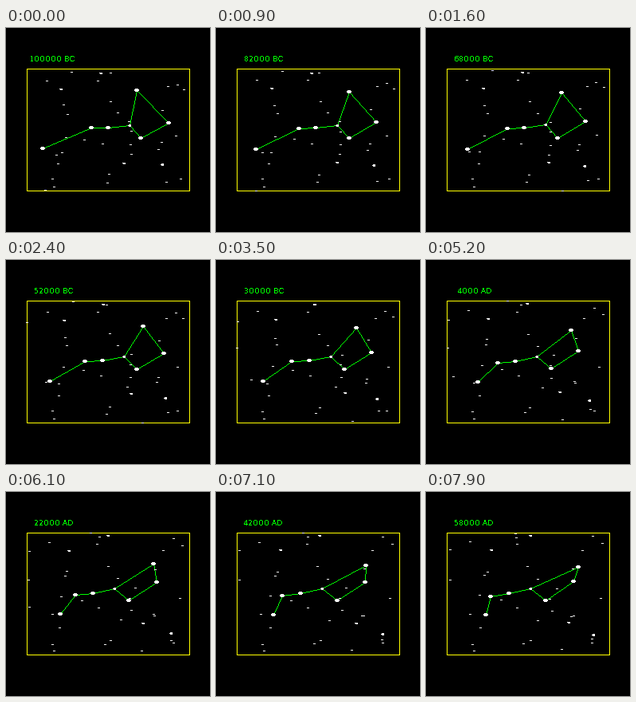
Write a matplotlib script that moves like this. It is 256x256 px and loops after 8 s.

```python
import numpy as np
import matplotlib as mpl
import matplotlib.pyplot as plt
from matplotlib.animation import FuncAnimation
from matplotlib.collections import PolyCollection
from matplotlib.patches import Rectangle

FRAMES, STEP = 80, 100
SIZE, DPI = 256, 64
PX = 72 / DPI  # points per pixel
LEFT, TOP, RIGHT, BOTTOM = 26, 51, 230, 204
GREEN, YELLOW = "#00ff00", "#ffff00"

mpl.rcParams["text.antialiased"] = False
mpl.rcParams["text.hinting"] = "force_autohint"
mpl.rcParams["text.hinting_factor"] = 1

# Widths of the pixel rows of a dot, by brightness.
DOTS = [[3], [4, 3], [3, 4, 3], [4, 6, 6, 4]]

# Brightness, then x, y at the start and at the end of the loop.
DIPPER = [
    (3, 46.3, 151.2, 75, 154), (3, 107, 125, 80.5, 130.5),
    (3, 128, 125, 103.5, 127.4), (2, 155, 121.6, 131, 121),
    (3, 164.4, 77.8, 190.7, 93.8), (3, 203.6, 118.8, 185, 111.8),
    (3, 169.4, 138, 150, 135.6),
]
LINK = [0, 1, 2, 3, 4, 5, 6, 3]
OTHERS = [
    (2, 196, 171, 210, 178.5), (1, 69, 77, 82, 72.5),
    (1, 148, 170, 179, 164), (1, 118.5, 57, 131, 54.5),
]


def field(n, seed=7, margin=12):
    """Faint stars: scattered evenly, most drift slowly and a few fast."""
    rng = np.random.default_rng(seed)
    x = rng.uniform(LEFT - margin, RIGHT + margin, n)
    y = rng.uniform(TOP - margin, BOTTOM + margin, n)
    dx, dy = rng.standard_t(2, (2, n)) * [[9], [4]]
    return np.column_stack([np.zeros(n), x, y, x + dx, y + dy])


STARS = np.vstack([DIPPER, OTHERS, field(42)])


def place(u):
    pos = STARS[:, 1:3] * (1 - u) + STARS[:, 3:] * u
    return np.floor(pos + 0.5)


def bar(x, y, w=1):
    return [(x, y), (x + w, y), (x + w, y + 1), (x, y + 1)]


def dot(x, y, level):
    rows = DOTS[int(level)]
    top = y - len(rows) // 2
    return [bar(x - w // 2, top + i, w) for i, w in enumerate(rows)]


def segment(a, b):
    """One-pixel line without smoothing."""
    n = int(abs(b - a).max()) + 1
    return [bar(x, y) for x, y in np.floor(np.linspace(a, b, n) + 0.5)]


def inside(x, y):
    return LEFT <= x <= RIGHT and TOP <= y <= BOTTOM


def crisp(color, z):
    shapes = PolyCollection([], facecolors=color, edgecolors="none",
                            antialiaseds=False, zorder=z)
    return ax.add_collection(shapes, autolim=False)


fig = plt.figure(figsize=(SIZE / DPI, SIZE / DPI), dpi=DPI, facecolor="black")
ax = fig.add_axes([0, 0, 1, 1])
ax.set_xlim(0, SIZE)
ax.set_ylim(SIZE, 0)
ax.axis("off")

ax.add_patch(Rectangle((LEFT, TOP), RIGHT - LEFT, BOTTOM - TOP,
                       fill=False, ec=YELLOW, lw=PX, aa=False))
lines = crisp(GREEN, 3)
stars = crisp("white", 4)
label = ax.text(30, 42, "", color=GREEN, family="DejaVu Sans",
                size=9 * PX, ha="left", va="baseline")


def draw(i):
    pos = place(i / (FRAMES - 1))
    path = pos[LINK]
    lines.set_verts([p for a, b in zip(path, path[1:])
                     for p in segment(a, b)])
    stars.set_verts([p for (x, y), level in zip(pos, STARS[:, 0])
                     if inside(x, y) for p in dot(x, y, level)])

    year = -100000 + 2000 * i
    digits = str(abs(year))
    label.set_text(f"{digits} {'BC' if year < 0 else 'AD'}")
    label.set_x(30 + 5 * (6 - len(digits)))
    return lines, stars, label


anim = FuncAnimation(fig, draw, frames=FRAMES, interval=STEP,
                     repeat=True, repeat_delay=0, blit=False)
plt.show()
```
